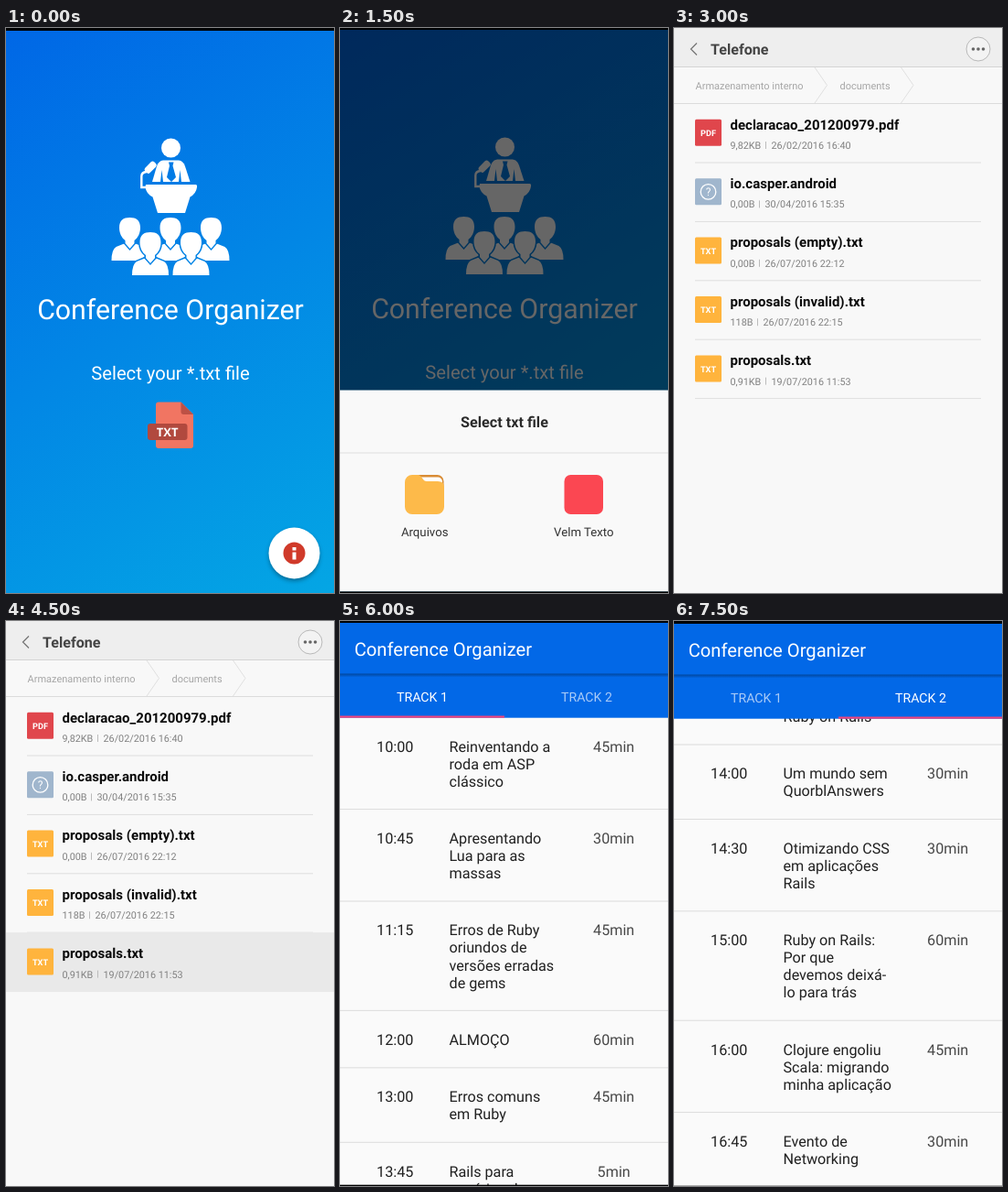
An HTML page that plays this animation: 359x617 px, repeating every 8000 ms.

```html
<!DOCTYPE html>
<html lang="pt">
<head>
<meta charset="utf-8">
<title>Conference Organizer</title>
<style>
html, body { margin: 0; width: 100%; height: 100%; overflow: hidden; background: #000; }
#strip { animation: play 8s step-end infinite; }
#strip > svg { display: block; overflow: hidden; }
text { font-family: Roboto, sans-serif; text-rendering: geometricPrecision; }
.mid { text-anchor: middle; }
.bold { font-weight: 700; }
@keyframes play {
  0% { transform: translateY(0); }
  18.75% { transform: translateY(-617px); }
  37.5% { transform: translateY(-1234px); }
  56.25% { transform: translateY(-1851px); }
  75% { transform: translateY(-2468px); }
  93.75% { transform: translateY(-3085px); }
}
</style>
</head>
<body>
<div id="strip"></div>
<svg width="0" height="0" style="position:absolute">
  <defs>
    <linearGradient id="sky" gradientUnits="userSpaceOnUse" x2="359" y2="617">
      <stop stop-color="#0067e6"/><stop offset="1" stop-color="#04a6e4"/>
    </linearGradient>
    <linearGradient id="shade" x2="0" y2="1">
      <stop stop-color="#002f6b" stop-opacity=".6"/><stop offset="1" stop-color="#002f6b" stop-opacity="0"/>
    </linearGradient>
    <filter id="blur" x="-30%" y="-30%" width="160%" height="160%"><feGaussianBlur stdDeviation="2.4"/></filter>
    <g id="person">
      <path d="M-5 28V25C-9 22-11.5 17-11.5 11C-11.5 3-7 0 0 0S11.5 3 11.5 11C11.5 17 9 22 5 25V28L15 32Q20 35 20 47H-20Q-20 35-15 32Z"/>
      <path d="M-7 27L0 35L7 27" fill="none" stroke="#000" stroke-width="1.4"/>
    </g>
    <mask id="emblem" maskUnits="userSpaceOnUse" x="100" y="110" width="160" height="170">
      <g fill="#fff">
        <circle cx="180.5" cy="131" r="10.5"/>
        <path d="M172 144.500H189Q194 145 196 151L201.500 168H160L165 151Q167 145 172 144.500Z"/>
        <g fill="#000">
          <path d="M178 146.500H183.500L182.500 150.500L186 163L181 168L176 163L179 150.500Z"/>
          <path d="M170.500 155L172 168H169ZM190.500 155L192 168H189Z"/>
        </g>
        <rect x="151" y="148.500" width="14" height="7.500" rx="2.500" transform="rotate(-45 158 152)"/>
        <path d="M154 157Q148.300 157.500 148.300 162V174H156" fill="none" stroke="#fff" stroke-width="2.400"/>
        <path d="M153 171H207.500Q209.500 171 209 174Q208 181 201.500 184.500L196 202H166L160.500 184.500Q153.500 181 152.500 174Z"/>
        <use href="#person" x="135.500" y="207"/>
        <use href="#person" x="180" y="207"/>
        <use href="#person" x="224.500" y="207"/>
        <g stroke="#000" stroke-width="3" paint-order="stroke">
          <use href="#person" x="158" y="223"/>
          <use href="#person" x="202.500" y="223"/>
        </g>
      </g>
    </mask>
    <g id="home">
      <rect width="359" height="620" fill="url(#sky)"/>
      <rect y="-1" width="359" height="4"/>
      <rect x="100" y="110" width="160" height="161" fill="#fff" mask="url(#emblem)"/>
      <g fill="#fff" class="mid">
        <text x="180" y="318.300" font-size="30.300">Conference Organizer</text>
        <text x="180" y="383.500" font-size="20.200">Select your *.txt file</text>
      </g>
      <path d="M167 408.500H191.500L205 422V456Q205 459 202 459H167Q164 459 164 456V411.500Q164 408.500 167 408.500Z" fill="#f17562"/>
      <path d="M191.500 408.500L205 422H194.500Q191.500 422 191.500 419Z" fill="#bd5145"/>
      <rect x="155" y="432" width="43.500" height="18" rx="3" fill="#b1493e"/>
      <text x="176.700" y="445.800" font-size="13" fill="#fff" class="mid bold" style="font-family:'Open Sans',sans-serif">TXT</text>
      <circle cx="315.500" cy="576" r="27.500" opacity=".38" filter="url(#blur)"/>
      <circle cx="315.500" cy="573.500" r="28" fill="#fff"/>
      <circle cx="315.500" cy="573.500" r="12" fill="#d03a2a"/>
      <path d="M313.500 567h4v3.500h-4zM313.500 572.500h4v8h-4z" fill="#fff"/>
    </g>
  </defs>
</svg>
<script>
const screen = body => `<svg width="359" height="617" viewBox="0 0 359 617">${body}</svg>`;
const rect = (x, y, w, h, fill, rx = 0) =>
  `<rect x="${x}" y="${y}" width="${w}" height="${h}" rx="${rx}" fill="${fill}"/>`;
const text = (x, y, size, fill, str, cls = '') =>
  `<text x="${x}" y="${y}" font-size="${size}" fill="${fill}" class="${cls}">${str}</text>`;
const line = (d, color, width = 1) =>
  `<path d="${d}" fill="none" stroke="${color}" stroke-width="${width}"/>`;

const home = screen('<use href="#home"/>');

const chooser = screen(`
  <use href="#home" y="-1"/>
  <rect width="359" height="617" opacity=".6"/>
  ${rect(0, 395.5, 359, 220, '#f9f9f9')}
  ${rect(0, 463.5, 359, 1, '#e0e0e0')}
  ${text(180, 436.3, 16.2, '#2b2b2b', 'Select txt file', 'mid bold')}
  ${rect(80, 488, 33.5, 20, '#d98c35', 7)}
  ${rect(84, 490.5, 28, 20, '#fff', 5)}
  <path d="M71 496a8 8 0 0 1 8-8H85Q88 488 90 491.500T95 495H107Q114 495 114 501V523a8 8 0 0 1-8 8H79a8 8 0 0 1-8-8Z" fill="#fdba4a"/>
  ${rect(245.5, 488, 42.5, 43, '#fb4752', 7)}
  ${text(92.7, 555, 13.2, '#333', 'Arquivos', 'mid')}
  ${text(266.8, 555, 13.2, '#333', 'Velm Texto', 'mid')}
  ${rect(0, 615.5, 359, 2, '#000')}`);

const files = [
  ['PDF', '#e0464c', 'declaracao_201200979.pdf', '9,82KB', 107, '26/02/2016 16:40'],
  ['?', '#a0b6cd', 'io.casper.android', '0,00B', 100, '30/04/2016 15:35'],
  ['TXT', '#ffb43d', 'proposals (empty).txt', '0,00B', 100, '26/07/2016 22:12'],
  ['TXT', '#ffb43d', 'proposals (invalid).txt', '118B', 98, '26/07/2016 22:15'],
  ['TXT', '#ffb43d', 'proposals.txt', '0,91KB', 107, '19/07/2016 11:53'],
];

function fileRow([kind, color, name, size, dateX, date], i, pressed) {
  const y = 82.5 + 64.4 * i;
  const label = kind === '?'
    ? `<circle cx="37.500" cy="${y + 32}" r="8.300" fill="none" stroke="#fff" stroke-width="1.300"/>` +
      text(37.5, y + 36.4, 12, '#fff', kind, 'mid')
    : text(37.5, y + 35.6, 9.2, '#fff', kind, 'mid bold');
  return (i === pressed ? rect(0, y, 359, 65, '#e9e9e9') : '') +
    rect(23, y + 17.3, 29, 29, color, 1.5) + label +
    text(61.5, y + 28, 15, '#0a0a0a', name, 'bold') +
    text(61.5, y + 49.5, 10.8, '#808080', size) +
    rect(dateX - 7, y + 41.5, 1, 8, '#bbb') +
    text(dateX - 0.5, y + 49.5, 10.8, '#808080', date) +
    (i === pressed ? '' : rect(23, y + 64, 313, 1, '#dfdfdf'));
}

const browser = pressed => screen(`
  ${rect(0, 0, 359, 617, '#f8f8f8')}
  ${rect(0, 0, 359, 42, '#eee')}
  ${rect(0, 42, 359, 1, '#d4d4d4')}
  ${line('M25 16.500L18.500 23L25 29.500', '#777', 1.3)}
  ${text(40, 29, 16.1, '#444', 'Telefone', 'bold')}
  <circle cx="333" cy="23" r="13" fill="#f3f3f3" stroke="#b9b9b9"/>
  ${[327.5, 333, 338.5].map(x => `<circle cx="${x}" cy="23" r="1.800" fill="#666"/>`).join('')}
  ${text(23.5, 67, 11, '#a6a6a6', 'Armazenamento interno')}
  ${text(181.5, 67, 11, '#a6a6a6', 'documents')}
  ${line('M154 43L167.500 62.500L154 82M248.500 43L262 62.500L248.500 82', '#e0e0e0')}
  ${rect(0, 82, 359, 1, '#dcdcdc')}
  ${files.map((file, i) => fileRow(file, i, pressed)).join('')}`);

function agenda(top, talks) {
  let y = top;
  return talks.map(([time, title, duration]) => {
    const lines = title.split('|');
    const base = y + 37.3;
    y += 62.5 + 18.95 * (lines.length - 1);
    return text(60.2, base, 16.2, '#212121', time, 'mid') +
      lines.map((s, i) => text(119.5, base + 19.1 * i, 16.2, '#212121', s)).join('') +
      text(299.7, base, 16.2, '#484848', duration, 'mid') +
      rect(0, y - 0.5, 359, 1, '#dcdcdc');
  }).join('');
}

const tracks = (active, shift, content) => screen(`
  ${rect(0, 0, 359, 617, '#fafafa')}
  ${content}
  <g transform="translate(0 ${shift})">
    ${rect(0, 0, 359, 105.7, '#0268e7')}
    ${rect(0, -2, 359, 4, '#000')}
    ${rect(0, 57.5, 359, 4, 'url(#shade)')}
    ${text(15.7, 38, 20.2, '#fff', 'Conference Organizer')}
    ${[0, 1].map(i => text(90 + 180 * i, 87.5, 14.2, i === active ? '#fff' : '#a9cbf7', `TRACK ${i + 1}`, 'mid')).join('')}
    ${rect(180 * active, 103.5, 180, 2.2, '#f0447c')}
    ${rect(0, 615.7, 359, 3, '#000')}
  </g>`);

const trackOne = agenda(105.2, [
  ['10:00', 'Reinventando a|roda em ASP|clássico', '45min'],
  ['10:45', 'Apresentando|Lua para as|massas', '30min'],
  ['11:15', 'Erros de Ruby|oriundos de|versões erradas|de gems', '45min'],
  ['12:00', 'ALMOÇO', '60min'],
  ['13:00', 'Erros comuns|em Ruby', '45min'],
  ['13:45', 'Rails para|usuários de', '5min'],
]);

const trackTwo = text(119.5, 109.9, 16.2, '#212121', 'Ruby on Rails') +
  rect(0, 134.5, 359, 1, '#dcdcdc') +
  agenda(135, [
    ['14:00', 'Um mundo sem|QuorblAnswers', '30min'],
    ['14:30', 'Otimizando CSS|em aplicações|Rails', '30min'],
    ['15:00', 'Ruby on Rails:|Por que|devemos deixá-|lo para trás', '60min'],
    ['16:00', 'Clojure engoliu|Scala: migrando|minha aplicação', '45min'],
    ['16:45', 'Evento de|Networking', '30min'],
  ]);

document.getElementById('strip').innerHTML = [
  home, chooser, browser(-1), browser(4), tracks(0, 0, trackOne), tracks(1, 1, trackTwo),
].join('');
</script>
</body>
</html>
```
